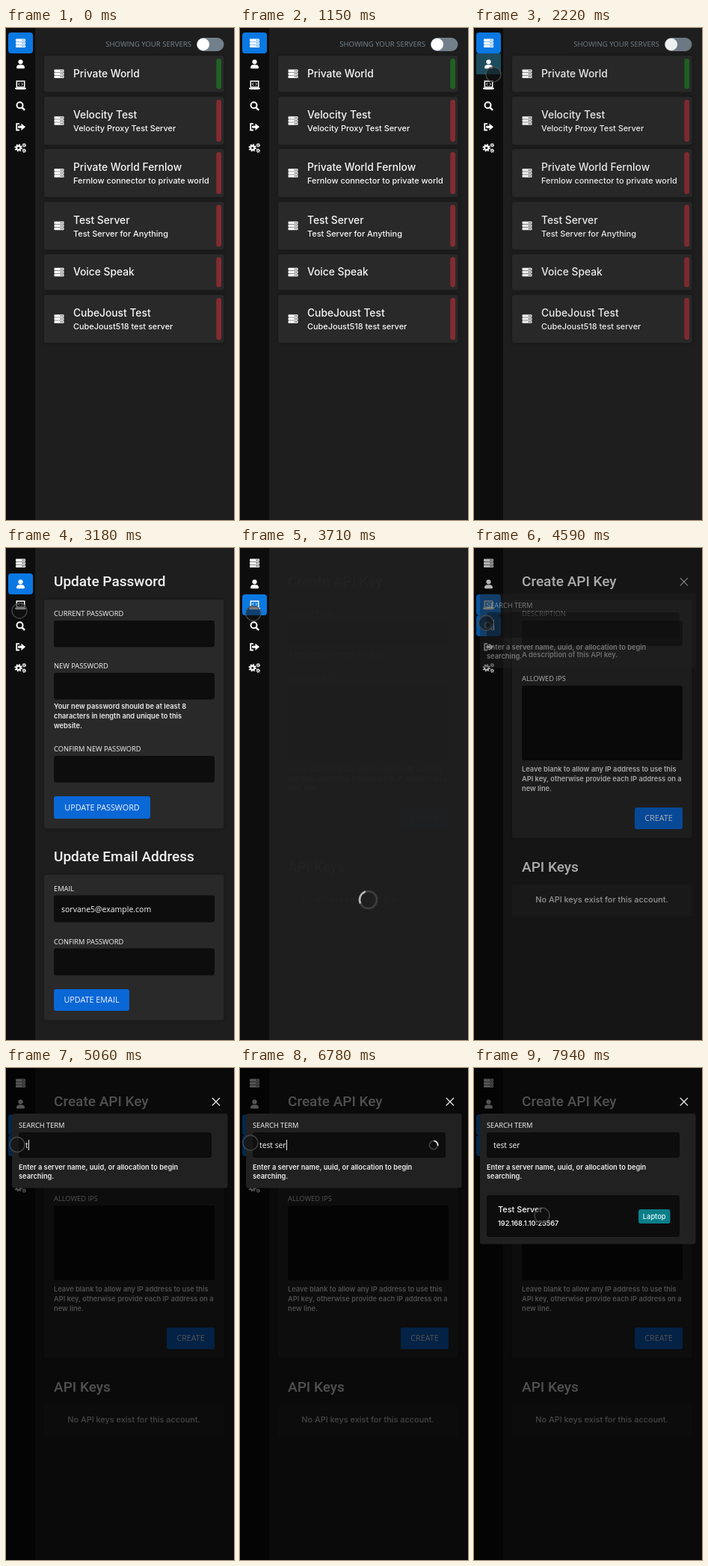
These frames come from a looping animation (305 px wide and 658 px high, 8000 ms). An HTML page with a canvas:

```html
<!DOCTYPE html>
<html lang="en">
<head>
<meta charset="utf-8">
<title>Server panel</title>
<style>
  html, body { margin: 0; width: 100%; height: 100%; overflow: hidden; background: #1e1e1e; }
  canvas { display: block; width: 305px; height: 658px; }
</style>
</head>
<body>
<canvas id="stage"></canvas>
<script>
const W = 305, H = 658, LOOP = 8000, SIDEBAR = 39;
const BG = '#1e1e1e', RAIL = '#0d0d0d', CARD = '#292929', FIELD = '#0d0d0d', BLUE = '#0a67d6';
const BODY = 'Inter, sans-serif', HEAD = 'Roboto, sans-serif', FORM = '"Open Sans", sans-serif';

const canvas = document.getElementById('stage');
const ratio = window.devicePixelRatio || 1;
canvas.width = W * ratio;
canvas.height = H * ratio;
const ctx = canvas.getContext('2d');
ctx.scale(ratio, ratio);

const ramp = (t, from, to) => Math.min(1, Math.max(0, (t - from) / (to - from)));
const smooth = k => k * k * (3 - 2 * k);

function box(x1, y1, x2, y2, color, radius = 3) {
  ctx.fillStyle = color;
  ctx.beginPath();
  ctx.roundRect(x1, y1, x2 - x1, y2 - y1, radius);
  ctx.fill();
}

function disc(x, y, r, color) {
  ctx.fillStyle = color;
  ctx.beginPath();
  ctx.arc(x, y, r, 0, Math.PI * 2);
  ctx.fill();
}

function ring(x, y, r, color, width, from = 0, to = Math.PI * 2) {
  ctx.strokeStyle = color;
  ctx.lineWidth = width;
  ctx.beginPath();
  ctx.arc(x, y, r, from, to);
  ctx.stroke();
}

function line(color, width, ...points) {
  ctx.strokeStyle = color;
  ctx.lineWidth = width;
  ctx.beginPath();
  points.forEach(([x, y]) => ctx.lineTo(x, y));
  ctx.stroke();
}

// y is the middle of the capital letters
function text(str, x, y, size, font = BODY, color = '#f8f8f8', weight = 500, align = 'left') {
  ctx.font = `${weight} ${size}px ${font}`;
  ctx.textAlign = align;
  ctx.fillStyle = color;
  ctx.fillText(str, x, Math.round(y + size * 0.36));
}

const heading = (str, y) => text(str, 64, y, 19, HEAD, '#f2f2f2', 500);
const label = (str, x, y) => text(str, x, y, 9.3, FORM);
const hint = (lines, x, y) => lines.forEach((s, i) => text(s, x, y + i * 12.6, 9.25, BODY, '#ececec', 600));

function panel(y1, y2) {
  ctx.shadowColor = 'rgba(0,0,0,.3)';
  ctx.shadowBlur = 5;
  box(51, y1, 291.5, y2, CARD);
  ctx.shadowBlur = 0;
}

function button(str, x1, y1, x2, y2) {
  box(x1, y1, x2, y2, BLUE);
  text(str, (x1 + x2) / 2, (y1 + y2) / 2, 10.8, FORM, '#f2f6ff', 400, 'center');
}

function spinner(x, y, r, width, angle) {
  ring(x, y, r, 'rgba(255,255,255,.2)', width);
  ring(x, y, r, '#e8e8e8', width, angle, angle + 1.7);
}

// ---- icons ----
function serverIcon(x, y, hole) {
  for (let i = -1; i <= 1; i++) {
    const cy = y + i * 4;
    box(x - 6.5, cy - 1.7, x + 6.5, cy + 1.7, '#fff', 0.8);
    disc(x + 2.6, cy, 0.7, hole);
    disc(x + 4.7, cy, 0.7, hole);
  }
}

function userIcon(x, y) {
  disc(x, y - 3, 3.1, '#fff');
  box(x - 5.4, y + 1, x + 5.4, y + 6, '#fff', [3.5, 3.5, 1, 1]);
}

function laptopIcon(x, y) {
  ctx.strokeStyle = '#fff';
  ctx.lineWidth = 1.5;
  ctx.strokeRect(x - 5.2, y - 5.2, 10.4, 8);
  line('#fff', 1, [x - 1.2, y - 3], [x - 3, y - 1.2], [x - 1.2, y + 0.6]);
  line('#fff', 1, [x + 1.2, y - 3], [x + 3, y - 1.2], [x + 1.2, y + 0.6]);
  box(x - 7.5, y + 3.7, x + 7.5, y + 6, '#fff', [0, 0, 2, 2]);
}

function searchIcon(x, y) {
  ring(x - 1, y - 1, 4, '#fff', 2);
  line('#fff', 2.4, [x + 2, y + 2], [x + 5.6, y + 5.6]);
}

function exitIcon(x, y) {
  line('#fff', 1.8, [x - 1.5, y - 4.2], [x - 5.3, y - 4.2], [x - 5.3, y + 4.2], [x - 1.5, y + 4.2]);
  box(x - 3.4, y - 1.5, x + 2, y + 1.5, '#fff', 0.5);
  ctx.beginPath();
  ctx.moveTo(x + 1, y - 4.6);
  ctx.lineTo(x + 6.5, y);
  ctx.lineTo(x + 1, y + 4.6);
  ctx.fill();
}

function gear(x, y, r) {
  const tooth = Math.PI * r / 8;
  ring(x, y, r * 0.62, '#fff', r * 0.5);
  ctx.setLineDash([tooth, tooth]);
  ring(x, y, r, '#fff', r * 0.45);
  ctx.setLineDash([]);
}

function gearsIcon(x, y) {
  gear(x - 2.8, y, 4.3);
  gear(x + 4.8, y - 3.6, 2.3);
  gear(x + 4.8, y + 3.8, 2.3);
}

const navIcons = [serverIcon, userIcon, laptopIcon, searchIcon, exitIcon, gearsIcon];

function sidebar(t) {
  box(0, 0, SIDEBAR, H, RAIL, 0);
  const active = t < 2290 ? 0 : t < 3640 ? 1 : 2;
  navIcons.forEach((icon, i) => {
    const y = 20 + i * 28;
    const on = i === active || (i === 3 && t >= 4460);
    if (on) box(3, y - 14, 36, y + 14, '#0a78e2', 4);
    else if (i === 1 && t >= 1760 && t < 2290) box(3, y - 14, 36, y + 14, '#1c4c5e', 1);
    icon(19.5, y + 0.3, on ? '#0a78e2' : RAIL);
  });
}

// ---- pages ----
const servers = [
  [37, 85.5, 'Private World'],
  [92, 156, 'Velocity Test', 'Velocity Proxy Test Server'],
  [162, 226, 'Private World Fernlow', 'Fernlow connector to private world'],
  [232.5, 296.5, 'Test Server', 'Test Server for Anything'],
  [302.5, 350.5, 'Voice Speak'],
  [357, 421, 'CubeJoust Test', 'CubeJoust518 test server']
];

function serversPage() {
  text('SHOWING YOUR SERVERS', 248, 21.5, 9.6, FORM, '#788693', 400, 'right');
  box(255, 13, 291.5, 31, '#72808c', 9);
  disc(263.8, 22, 8.3, '#fff');
  servers.forEach(([y1, y2, name, note], i) => {
    const mid = (y1 + y2) / 2;
    panel(y1, y2);
    serverIcon(71, mid, CARD);
    text(name, 90, note ? mid - 7.7 : mid, 13.8);
    if (note) text(note, 90, mid + 10.2, 10.9);
    box(281.3, y1 + 4, 288, y2 - 4, i ? '#842b31' : '#1f6323', 3);
  });
}

function accountPage() {
  heading('Update Password', 44);
  panel(69, 375);
  [['CURRENT PASSWORD', 87.5], ['NEW PASSWORD', 157.5], ['CONFIRM NEW PASSWORD', 268.5]].forEach(([name, y]) => {
    label(name, 64, y);
    box(64, y + 9.5, 279, y + 45, FIELD);
  });
  hint(['Your new password should be at least 8', 'characters in length and unique to this', 'website.'], 64, 212);
  button('UPDATE PASSWORD', 64, 332, 193, 362);

  heading('Update Email Address', 412);
  panel(437, 631.5);
  [['EMAIL', 455.5], ['CONFIRM PASSWORD', 526.5]].forEach(([name, y]) => {
    label(name, 64, y);
    box(64, y + 9, 279, y + 45, FIELD);
  });
  text('sorvane5@example.com', 74, 483, 10.5, FORM);
  button('UPDATE EMAIL', 64, 590, 165, 619);
}

function keysPage() {
  heading('Create API Key', 44);
  panel(69, 388);
  label('DESCRIPTION', 64, 87.5);
  box(64, 97, 279, 131, FIELD);
  hint(['A description of this API key.'], 64, 143);
  label('ALLOWED IPS', 64, 175);
  box(64, 184, 279, 284, FIELD);
  hint(['Leave blank to allow any IP address to use this', 'API key, otherwise provide each IP address on a', 'new line.'], 64, 296);
  button('CREATE', 215, 347, 279, 376);
  heading('API Keys', 426);
  box(51, 450, 291.5, 492, '#242424');
  text('No API keys exist for this account.', 171, 470, 10.9, BODY, '#d2d2d2', 500, 'center');
}

function content(t) {
  let opacity;
  if (t < 2380) {
    serversPage();
    opacity = 1 - ramp(t, 2210, 2370);
  } else if (t < 3700) {
    accountPage();
    opacity = ramp(t, 2380, 2640) * (1 - ramp(t, 3540, 3700));
  } else {
    keysPage();
    opacity = ramp(t, 3700, 4260);
  }
  ctx.globalAlpha = 1 - opacity;
  box(SIDEBAR, 0, W, H, BG, 0);
  ctx.globalAlpha = 1;
  if (t >= 3640 && t < 4190) {
    ctx.globalAlpha = 0.7;
    spinner(171.5, 470.5, 11.5, 2.6, -1.9 + (t - 3980) / 1000 * Math.PI * 2);
    ctx.globalAlpha = 1;
  }
}

// ---- search dialog ----
const keyTimes = [5020, 5270, 5530, 5740, 5950, 6100, 6290, 6430];

function dialog(t) {
  const shown = ramp(t, 4460, 4760);
  if (!shown) return;
  ctx.globalAlpha = shown;
  box(0, 0, W, H, 'rgba(0,0,0,.67)', 0);
  line('#e6e6e6', 1.3, [275.8, 40], [286, 50.2]);
  line('#e6e6e6', 1.3, [286, 40], [275.8, 50.2]);

  const found = t >= 7190;
  box(8, 61, 296.5, found ? 235.5 : 160.5, '#212121');
  label('SEARCH TERM', 17, 76.5);
  box(17, 86, 275, 120, FIELD);
  const typed = 'test ser'.slice(0, keyTimes.filter(k => t >= k).length);
  text(typed, 26, 103, 10.3, FORM);
  if (t < 7800) {
    const x = Math.round(26 + ctx.measureText(typed).width);
    box(x, 96, x + 1, 110, '#e8e8e8', 0);
  }
  if (t >= 6080 && !found) spinner(259, 103, 5.6, 1.8, -1.5 + (t - 6780) / 1000 * Math.PI * 2);
  hint(['Enter a server name, uuid, or allocation to begin', 'searching.'], 17, 132.5);

  if (found) {
    ctx.globalAlpha = ramp(t, 7120, 7330);
    box(17, 170, 275, 226, FIELD);
    text('Test Server', 32, 189, 10.9);
    text('192.168.1.10:25567', 32, 208, 9.1, BODY, '#ececec', 600);
    box(220, 189, 262.5, 208, '#0b7f89');
    text('Laptop', 241.2, 198.7, 9.3, BODY, '#e6fbfc', 500, 'center');
  }
  ctx.globalAlpha = 1;
}

// ---- touch pointer: time, x, y ----
const arc = [[500, 237, 670], [700, 200, 540], [830, 150, 473], [960, 95, 530], [1150, 61, 670]];
const path = [
  [1380, 44, -11], [1540, 40, 20], [1830, 26, 62], [2290, 26, 62], [2640, 21, 77],
  [2770, 21, 77], [2840, 18.5, 81.5], [3110, 18.5, 81.5], [3180, 18, 84], [3510, 18, 84],
  [3980, 17.5, 93], [4460, 17, 98], [4790, 15, 104.5], [4990, 15, 104.5], [5060, 15, 102.5],
  [5530, 15, 102.5], [6290, 14, 100], [6850, 14, 100], [6980, 11, 140], [7120, 40, 202],
  [7400, 88, 212], [7610, 109, 214], [7740, 109, 214], [7940, 91, 197], [8000, 91, 197]
];

function pointer(t) {
  const track = t < 1200 ? arc : path;
  const i = track.findIndex(p => p[0] > t);
  if (i < 1) return;
  const [t0, x0, y0] = track[i - 1], [t1, x1, y1] = track[i];
  const k = track === arc ? ramp(t, t0, t1) : smooth(ramp(t, t0, t1));
  const x = x0 + (x1 - x0) * k, y = y0 + (y1 - y0) * k;
  disc(x, y, 10, 'rgba(18,18,18,.55)');
  ring(x, y, 10, 'rgba(80,80,80,.8)', 1.4);
}

function draw(now) {
  const t = now % LOOP;
  box(0, 0, W, H, BG, 0);
  content(t);
  sidebar(t);
  dialog(t);
  pointer(t);
  requestAnimationFrame(draw);
}
requestAnimationFrame(draw);
</script>
</body>
</html>
```
